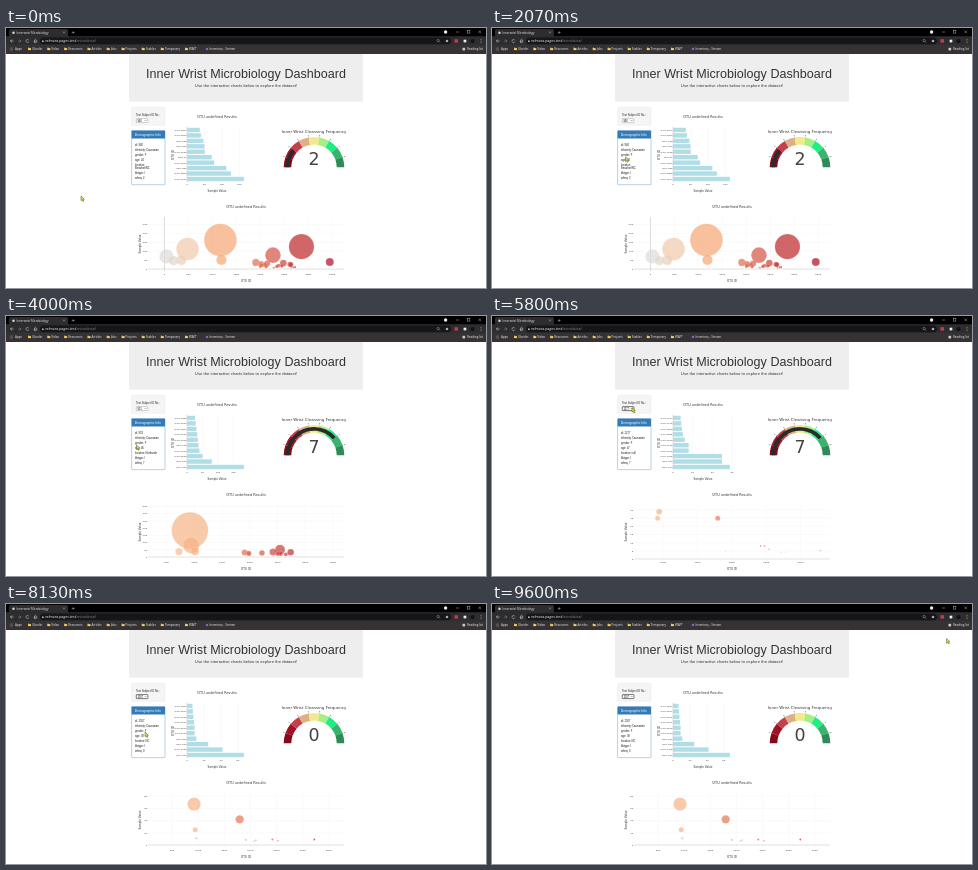
Recreate the animation shown at these times as an HTML page with a canvas. Size 480 by 260 pixels, loop 9.67 s.

```html
<!DOCTYPE html>
<html lang="en">
<head>
<meta charset="utf-8">
<title>Dashboard</title>
<style>
html, body { margin: 0; width: 100%; height: 100%; overflow: hidden; background: #fff; }
canvas { display: block; width: 480px; height: 260px; }
</style>
</head>
<body>
<canvas id="stage"></canvas>
<script>
const LOOP = 9670;
const SANS = '"Liberation Sans", Arial, sans-serif';
const PLOT = '"DejaVu Sans", Verdana, sans-serif';
const UI = '"Open Sans", sans-serif';
const INK = '#333';
const canvas = document.getElementById('stage');
const ctx = canvas.getContext('2d');
const dpr = Math.max(1, window.devicePixelRatio || 1);
canvas.width = 480 * dpr;
canvas.height = 260 * dpr;

// Each subject names its largest samples as [otu, value]; the rest tail off by rule.
const subjects = [
  {
    start: 0, id: '940', age: 24, location: ['', 'Beaufort/NC'], wash: 2, count: 30,
    main: [[1167, 163], [2859, 126], [482, 113], [2264, 78], [41, 71], [1189, 51], [352, 50], [189, 47], [3450, 40]],
    barStep: 50, step: 50, x: [-344, 3747], y: [-11, 287]
  },
  {
    start: 2670, id: '953', age: 46, location: ['Northvale'], wash: 7, count: 14,
    main: [[922, 183], [944, 80], [2546, 50], [1013, 40], [725, 37], [2419, 35], [2737, 33]],
    barStep: 50, step: 50, x: [167, 3698], y: [-14, 352]
  },
  {
    start: 5070, id: '1277', age: 47, location: ['null'], wash: 7, count: 10,
    main: [[944, 29], [922, 25], [1795, 25], [2419, 8], [2475, 8], [2540, 6], [3285, 5]],
    barStep: 10, step: 5, x: [578, 3427], y: [0, 32.5]
  },
  {
    start: 8130, id: '1507', age: 39, location: ['NC'], wash: 0, count: 10,
    main: [[922, 67], [1795, 42], [944, 25], [963, 11], [2419, 9], [3222, 9]],
    barStep: 20, step: 20, x: [42, 3790], y: [-3.3, 83.6]
  }
];

function random(seed) {
  return () => (seed = seed * 16807 % 2147483647) / 2147483647;
}

for (const s of subjects) {
  const rnd = random(+s.id);
  const least = s.main.at(-1)[1];
  const tail = Array.from({ length: s.count - s.main.length }, (_, i) =>
    [Math.round(1900 + rnd() * 900), least * .92 ** (i + 1)]);
  s.samples = [...s.main, ...tail];
}

// Pointer moves: start time, end time, x, y
const moves = [
  [0, 0, 75, 168], [70, 730, 137.5, 90.5], [870, 1000, 135, 104], [1330, 2070, 133.5, 129],
  [2720, 3070, 137, 91], [3870, 4000, 130.5, 129], [5470, 5800, 140, 91.5],
  [6470, 6930, 139, 128], [8150, 8950, 448, 50], [8960, 9200, 478, 25], [9200, 9600, 454.5, 34.5]
];

const steps = ['#870818', '#a01226', '#c4414c', '#deb08a', '#f2e98c', '#a9ef83', '#19f183', '#38b56d', '#2e8b57'];
const reds = [[0, 220, 220, 220], [.2, 245, 195, 157], [.4, 245, 160, 105], [1, 178, 10, 28]];

const lerp = (a, b, k) => a + (b - a) * k;

function pointerAt(t) {
  const i = moves.findLastIndex(m => t >= m[0]);
  const [from, to, x, y] = moves[i];
  const [, , x0, y0] = moves[Math.max(0, i - 1)];
  const k = to > from ? Math.min(1, (t - from) / (to - from)) : 1;
  const eased = k * k * (3 - 2 * k);
  return [lerp(x0, x, eased), lerp(y0, y, eased)];
}

function redScale(k) {
  k = Math.min(1, k);
  const i = Math.max(1, reds.findIndex(s => k <= s[0]));
  const [a, b] = [reds[i - 1], reds[i]];
  const f = (k - a[0]) / (b[0] - a[0]);
  return `rgb(${[1, 2, 3].map(n => Math.round(lerp(a[n], b[n], f)))})`;
}

function rect(x, y, w, h, fill) {
  ctx.fillStyle = fill;
  ctx.fillRect(x, y, w, h);
}

function box(x, y, w, h, r, fill, stroke, width = .3) {
  ctx.beginPath();
  ctx.roundRect(x, y, w, h, r);
  ctx.fillStyle = fill;
  ctx.fill();
  if (stroke) {
    ctx.strokeStyle = stroke;
    ctx.lineWidth = width;
    ctx.stroke();
  }
}

function dot(x, y, r, fill) {
  ctx.beginPath();
  ctx.arc(x, y, r, 0, Math.PI * 2);
  ctx.fillStyle = fill;
  ctx.fill();
}

function line(color, width, ...pts) {
  ctx.beginPath();
  for (let i = 0; i < pts.length; i += 2) ctx.lineTo(pts[i], pts[i + 1]);
  ctx.strokeStyle = color;
  ctx.lineWidth = width;
  ctx.stroke();
}

function cross(x, y, r) {
  line('#ddd', .4, x - r, y - r, x + r, y + r);
  line('#ddd', .4, x + r, y - r, x - r, y + r);
}

// Drawn at ten times the size and scaled down, so tiny type keeps its spacing. Returns the width.
function text(str, x, y, size, color, { font = PLOT, align = 'left', turn = 0 } = {}) {
  ctx.save();
  ctx.translate(x, y);
  ctx.rotate(turn);
  ctx.scale(.1, .1);
  ctx.font = `${size * 10}px ${font}`;
  ctx.textAlign = align;
  ctx.fillStyle = color;
  ctx.fillText(str, 0, 0);
  const width = ctx.measureText(str).width / 10;
  ctx.restore();
  return width;
}

const centered = { align: 'center' };
const toRight = { align: 'right' };
const upright = { align: 'center', turn: -Math.PI / 2 };
const ui = { font: UI };

function drawBrowser() {
  rect(0, 0, 480, 26, '#363234');
  rect(0, 0, 480, 8.5, '#000');
  box(3, 1, 59, 9, 1.5, '#2d2d30');
  rect(0, 8.5, 480, 8.3, '#2d2d30');

  dot(7.5, 4.7, 1.2, '#ddd');
  text('Innerwrist Microbiology', 10.5, 5.8, 2.9, '#eee', ui);
  cross(58, 4.4, .9);
  line('#ddd', .4, 65.8, 4.5, 68.6, 4.5);
  line('#ddd', .4, 67.2, 3.1, 67.2, 5.9);
  dot(439.6, 4, 1.7, '#eee');
  line('#ddd', .4, 450, 4, 453, 4);
  ctx.strokeRect(461.5, 2.7, 2.4, 2.4);
  cross(473.8, 3.9, 1.3);

  box(34, 9.5, 411, 6.8, 3.4, '#161618');
  line('#ddd', .5, 6, 11.4, 4.4, 13, 6, 14.6);
  line('#ddd', .5, 4.4, 13, 7.6, 13);
  line('#888', .5, 13.5, 11.4, 15.1, 13, 13.5, 14.6);
  line('#888', .5, 11.9, 13, 15.1, 13);
  ctx.beginPath();
  ctx.arc(21.5, 13, 1.5, .5, 5.7);
  ctx.strokeStyle = '#ddd';
  ctx.stroke();
  line('#ddd', .5, 27.7, 13, 29.5, 11.3, 31.3, 13);
  ctx.strokeRect(28.3, 13, 2.4, 1.7);
  rect(36, 12.4, 1.7, 1.7, '#aaa');
  const domain = text('velmora.pages.test', 39, 14.2, 3.5, '#f0f0f0', ui);
  text('/microbiota/', 39 + domain, 14.2, 3.5, '#888', ui);

  ctx.beginPath();
  ctx.arc(432.2, 12.6, 1.2, 0, 7);
  ctx.strokeStyle = '#ccc';
  ctx.lineWidth = .4;
  ctx.stroke();
  line('#ccc', .4, 433, 13.5, 434, 14.5);
  dot(441, 13, 1.3, '#aaa');
  rect(448.5, 11.2, 3.5, 3.5, '#c33a3f');
  rect(457.6, 11.7, 2.7, 2.7, '#eee');
  dot(466.5, 13, 2, '#111');
  for (let i = 0; i < 3; i++) dot(475, 11.3 + i * 1.7, .45, '#ddd');

  for (let i = 0; i < 9; i++) {
    dot(4.2 + i % 3 * 1.1, 19.9 + Math.floor(i / 3) * 1.1, .4, ['#d66', '#6c8', '#68d'][i % 3]);
  }
  text('Apps', 9, 22.2, 3, '#eee', ui);
  let x = 26;
  for (const name of ['Ubodin', 'Video', 'Resources', 'Articles', 'Jobs', 'Projects', 'Stables', 'Temporary', 'WAFT']) {
    rect(x - 4, 19.7, 1.3, .7, '#efcf62');
    rect(x - 4, 20.1, 3, 2, '#efcf62');
    x += text(name, x, 22.2, 3, '#eee', ui) + 9;
  }
  dot(201, 21, 1.3, '#8b5bd6');
  text('Inventory - Stream', 203.5, 22.2, 3, '#eee', ui);
  rect(456.5, 19.8, 2.6, 2.6, '#ccc');
  text('Reading list', 461, 22.2, 3, '#eee', ui);
}

function drawHeader() {
  rect(123, 26, 234, 47.5, '#eee');
  const style = { font: SANS, align: 'center' };
  text('Inner Wrist Microbiology Dashboard', 240, 50.2, 12.6, '#333', style);
  text('Use the interactive charts below to explore the dataset!', 240, 59.3, 4.2, '#333', style);
}

function drawSidebar(s, focused) {
  const style = { font: SANS };
  box(125.6, 79.3, 33.4, 18, .8, '#f5f5f5', '#ddd');
  text('Test Subject ID No.:', 130, 88, 2.7, '#222', style);
  box(130.3, 90.6, 11.6, 4, .5, '#fff', focused ? '#222' : '#777', focused ? .6 : .35);
  text(s.id, 131.4, 93.6, 2.6, '#111', style);
  line(INK, .4, 138.7, 92.1, 139.6, 93, 140.5, 92.1);

  const rows = [`id: ${s.id}`, 'ethnicity: Caucasian', 'gender: F', `age: ${s.age}`, `location: ${s.location[0]}`];
  const extra = s.location.slice(1);
  box(125.6, 102.6, 33.4, 51 + extra.length * 3.1, .8, '#fff', '#337ab7', .35);
  rect(125.6, 102.6, 33.4, 7.9, '#337ab7');
  text('Demographic Info', 128.8, 107.7, 3.3, '#fff', style);
  const put = (row, y) => text(row, 129, y, 2.65, '#111', style);
  rows.forEach((row, i) => put(row, 118 + i * 4.95));
  extra.forEach(row => put(row, 140.9));
  const y = 142.8 + extra.length * 3.1;
  put('bbtype: I', y);
  put(`wfreq: ${s.wash}`, y + 4.95);
}

function drawBars(s) {
  const left = 181, top = s.samples[0][1], scale = 56.8 / top;
  text('OTU undefined Results', 211, 89.6, 3.45, INK, centered);
  for (let v = 0; v <= top * 1.05; v += s.barStep) {
    const x = left + v * scale;
    line(v ? '#eee' : '#999', .3, x, 98.5, x, 154);
    text(v, x, 157.4, 2.4, INK, centered);
  }
  s.samples.slice(0, 10).forEach(([otu, value], i) => {
    const y = 151 - i * 5.45;
    rect(left, y - 2.2, value * scale, 4.4, '#b0dde6');
    text(`OTU ${otu}`, left - .4, y + .9, 2.4, INK, toRight);
  });
  text('Sample Value', 211, 164, 2.8, INK, centered);
  text('OTU ID', 168.3, 127, 2.8, INK, upright);
}

function ring(cx, cy, r0, r1, from, to, fill) {
  const a = Math.PI * (1 + from / 9), b = Math.PI * (1 + to / 9);
  ctx.beginPath();
  ctx.arc(cx, cy, r1, a, b);
  ctx.arc(cx, cy, r0, b, a, true);
  ctx.closePath();
  ctx.fillStyle = fill;
  ctx.fill();
}

function drawGauge(s) {
  const cx = 308, cy = 139.3, outer = 30.3, inner = outer * .75;
  const mid = (outer + inner) / 2, half = (outer - inner) / 4;
  text('Inner Wrist Cleansing Frequency', cx, 105, 4, INK, centered);
  steps.forEach((color, i) => ring(cx, cy, inner, outer, i, i + 1, color));
  if (s.wash) ring(cx, cy, mid - half, mid + half, 0, s.wash, '#2b2b2b');
  for (let n = 1; n < 9; n++) {
    const a = Math.PI * (1 + n / 9), c = Math.cos(a), d = Math.sin(a);
    line('#444', .3, cx + c * outer, cy + d * outer, cx + c * 31.5, cy + d * 31.5);
    text(n, cx + c * 32.8, cy + d * 32.8 + .8, 2.2, INK, centered);
  }
  text(s.wash, cx, 137.3, 17.5, '#444', centered);
}

function ticks([lo, hi], step, draw) {
  for (let v = Math.ceil(lo / step) * step; v <= hi; v += step) draw(v || 0);
}

function drawBubbles(s) {
  const left = 142, right = 338, top = 190, bottom = 243;
  const px = v => lerp(left, right, (v - s.x[0]) / (s.x[1] - s.x[0]));
  const py = v => lerp(bottom, top, (v - s.y[0]) / (s.y[1] - s.y[0]));
  text('OTU undefined Results', 240, 179.6, 3.45, INK, centered);
  ticks(s.x, 500, v => {
    line(v ? '#eee' : '#888', .3, px(v), top - 1, px(v), bottom);
    text(v, px(v), 247, 2.4, INK, centered);
  });
  ticks(s.y, s.step, v => {
    line(v ? '#eee' : '#999', .3, left, py(v), right, py(v));
    text(v, left - .8, py(v) + .9, 2.4, INK, toRight);
  });
  ctx.globalAlpha = .7;
  for (const [otu, value] of s.samples) {
    dot(px(otu), py(value), value * .1, redScale(otu / 3200));
    ctx.strokeStyle = '#fff';
    ctx.lineWidth = .2;
    ctx.stroke();
  }
  ctx.globalAlpha = 1;
  text('OTU ID', 240, 254, 2.8, INK, centered);
  text('Sample Value', 135, 216, 2.8, INK, upright);
}

function drawPointer(t) {
  if (t > 8950 && t < 9200) return;
  ctx.save();
  ctx.translate(...pointerAt(t));
  ctx.beginPath();
  for (const p of [[0, 0], [0, 4.6], [1.1, 3.7], [1.9, 5.4], [2.8, 5], [2, 3.3], [3.4, 3.2]]) ctx.lineTo(...p);
  ctx.closePath();
  ctx.fillStyle = '#e6e23c';
  ctx.fill();
  ctx.strokeStyle = '#55551c';
  ctx.lineWidth = .5;
  ctx.stroke();
  ctx.restore();
}

function draw(now) {
  const t = now % LOOP;
  const s = subjects.findLast(subject => t >= subject.start);
  ctx.setTransform(dpr, 0, 0, dpr, 0, 0);
  rect(0, 0, 480, 260, '#fff');
  drawBrowser();
  drawHeader();
  drawSidebar(s, t >= 5070);
  drawBars(s);
  drawGauge(s);
  drawBubbles(s);
  drawPointer(t);
}

const began = performance.now();
function tick() {
  draw(performance.now() - began);
  requestAnimationFrame(tick);
}
tick();
</script>
</body>
</html>
```
